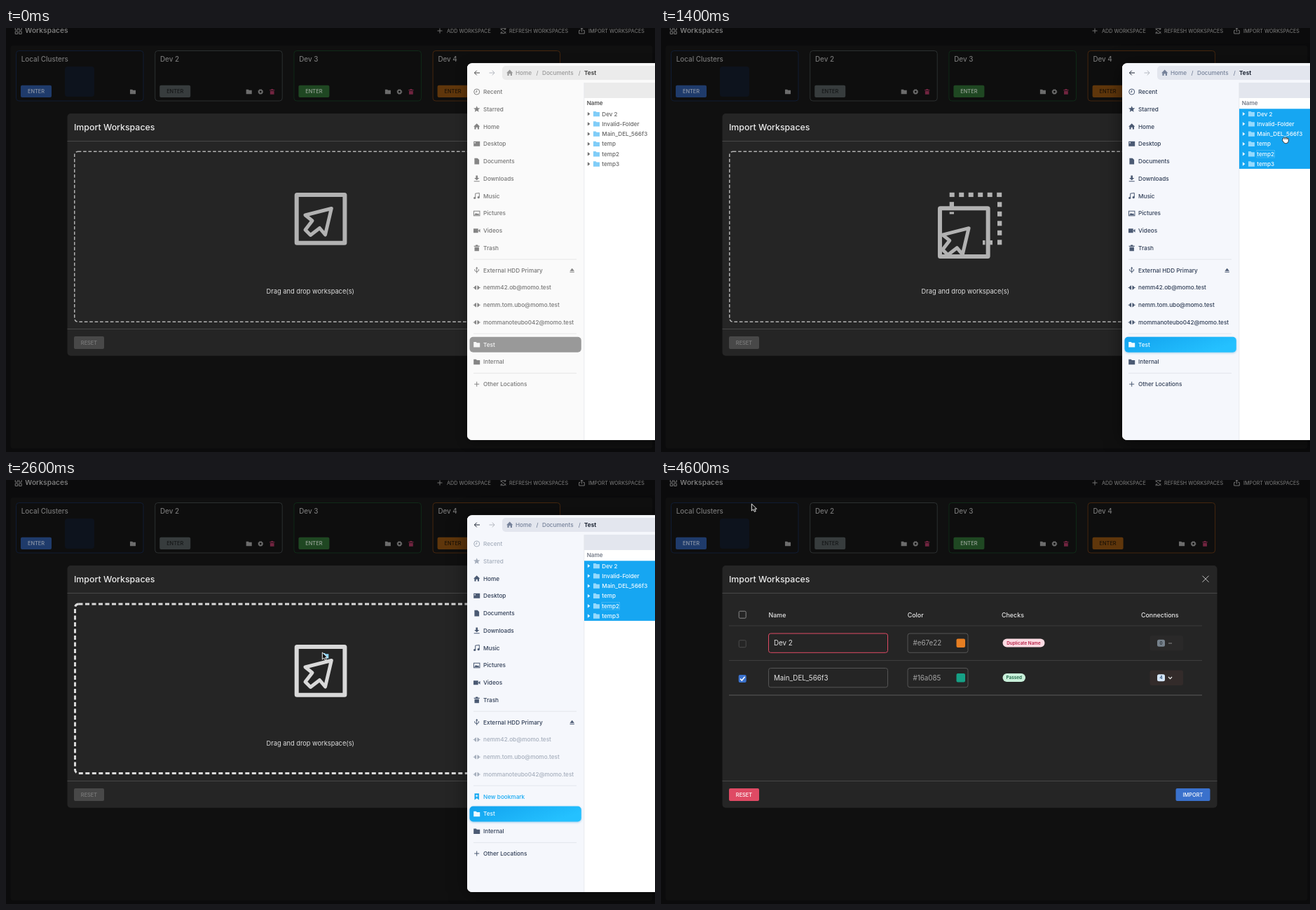
Recreate the animation shown at these times as an HTML page. Size 926 px wide and 605 px high, loop 4.8 s.

```html
<!DOCTYPE html>
<html lang="en">
<head>
<meta charset="utf-8">
<title>Import Workspaces</title>
<style>
html, body { margin: 0; width: 100%; height: 100%; overflow: hidden; background: #0b0b0c; }
svg { display: block; width: 926px; height: 605px; font-family: Inter, sans-serif; }
text { white-space: pre; }
.line { fill: none; stroke: currentColor; stroke-width: 1; }
</style>
</head>
<body>
<svg id="stage" viewBox="0 0 926 605"></svg>
<script>
const LOOP = 4800, STEP = 100;
const PANEL = '#252525', BLUE = '#3a71cc', RED = '#df4a64';

const rect = (x, y, w, h, fill, r = 0, extra = '') =>
  `<rect x="${x}" y="${y}" width="${w}" height="${h}" rx="${r}" fill="${fill}" ${extra}/>`;
const box = (x, y, w, h, stroke, r = 3, fill = 'none') =>
  rect(x, y, w, h, fill, r, `stroke="${stroke}"`);
const hline = (x1, x2, y, color) => rect(x1, y - 0.5, x2 - x1, 1, color);
// y is the middle of the capitals
const text = (x, y, s, size, fill, weight = 400, anchor = 'start') =>
  `<text x="${x}" y="${y + size * 0.364}" font-size="${size}" fill="${fill}" font-weight="${weight}" text-anchor="${anchor}">${s}</text>`;
const fillPath = d => `<path fill="currentColor" d="${d}"/>`;
const linePath = d => `<path class="line" d="${d}"/>`;

const ICONS = {
  clock: '<circle class="line" r="4"/>' + linePath('M0-2.3V.3H-2'),
  star: fillPath('M0-4.6 1.3-1.5 4.6-1.3 2.1.8 2.9 4 0 2.3-2.9 4-2.1.8-4.6-1.3-1.3-1.5Z'),
  home: fillPath('M0-4.4 4.6.2H3.3V4H1.1V1.2H-1.1V4H-3.3V.2H-4.6Z'),
  desktop: fillPath('M-4.5-3.5H4.5V3.5H-4.5ZM-3.4-2.4V-.8H-1.8V-2.4Z'),
  doc: fillPath('M-3.3-4.4H1L3.4-2V4.4H-3.3Z'),
  down: fillPath('M-1.3-4.4H1.3V-.8H3.6L0 2.4-3.6-.8H-1.3ZM-4 3.3H4V4.4H-4Z'),
  music: linePath('M-2 2.8V-3.5L3.6-4.2V1.9') + '<circle cx="-3" cy="2.8" r="1.6" fill="currentColor"/><circle cx="2.5" cy="2" r="1.6" fill="currentColor"/>',
  picture: '<rect class="line" x="-4.2" y="-3.2" width="8.4" height="6.6"/>' + fillPath('M-3.5 2.6-1.2-.7.6 1 1.8-.2 3.6 2.6Z'),
  video: fillPath('M-4.7-3H2V3H-4.7ZM2.4-.4 4.8-2.6V2.6L2.4.4Z'),
  trash: fillPath('M-4-3.3H-1.6V-4.4H1.6V-3.3H4V-2H-4ZM-3.2-1.2H3.2V4.3H-3.2Z'),
  usb: linePath('M0 4V-4M-2.8-1.5V.6L0 2.4 2.8.6V-1.5') + fillPath('M0-5 1.6-2.5H-1.6Z'),
  net: linePath('M-5 0H-3M3 0H5') + fillPath('M-3.4-1.5-.7-3.2V3.2L-3.4 1.5ZM3.4-1.5.7-3.2V3.2L3.4 1.5Z'),
  folder: fillPath('M-4.5-3.7H-.9L.1-2.5H4.5V3.7H-4.5Z'),
  plus: linePath('M-3.5 0H3.5M0-3.5V3.5'),
  mark: fillPath('M-3.2-4.5H3.2V4.7L0 2.3-3.2 4.7ZM-.5-2.8V-1.5H-1.8V-.5H-.5V.8H.5V-.5H1.8V-1.5H.5V-2.8Z'),
  eject: fillPath('M0-3 3.2 1H-3.2ZM-3.2 2H3.2V3.1H-3.2Z'),
  gear: '<circle r="2.6" fill="none" stroke="currentColor" stroke-width="2"/><circle class="line" r="3.8" stroke-dasharray="1.5 1.5"/>',
  grid: linePath('M-4.5-4.5H-1V-1H-4.5ZM1-4.5H4.5V-1H1ZM-4.5 1H-1V4.5H-4.5ZM1 1H4.5V4.5H1Z'),
  refresh: linePath('M-3.6-1A3.7 3.7 0 0 1 3-2.3M3.6 1A3.7 3.7 0 0 1-3 2.3M3.3-4.4V-2H1M-3.3 4.4V2H-1M-4-3.5 4 3.8'),
  upload: linePath('M0 1.5V-4M-2-2.2 0-4.2 2-2.2M-2-.5H-3.8V4H3.8V-.5H2'),
  back: linePath('M4 0H-3.5M-.3-3.3-3.6 0-.3 3.3'),
  tri: fillPath('M-1.6-2.7 1.9 0-1.6 2.7Z'),
};
const icon = (name, x, y, color, scale = 1) =>
  `<g color="${color}" transform="translate(${x} ${y}) scale(${scale})">${ICONS[name]}</g>`;

const CARDS = [
  ['Local Clusters', '#101c33', '#1f3b6b', '#8f98a8'],
  ['Dev 2', '#2c3031', '#373c3d', '#141617'],
  ['Dev 3', '#102b18', '#1f4722', '#98a498'],
  ['Dev 4', '#45270f', '#5f360b', '#1c1206'],
];

function page() {
  let s = rect(0, 0, 926, 605, '#0b0b0c') + rect(6.5, 25, 916, 575, '#101010', 4);
  s += icon('grid', 17.7, 4, '#747474') + text(27, 3.7, 'Workspaces', 10.2, '#7a7a7a', 600);
  [['plus', 619, 629, 'ADD WORKSPACE'], ['refresh', 709.5, 718, 'REFRESH WORKSPACES'], ['upload', 821.5, 831, 'IMPORT WORKSPACES']]
    .forEach(([name, ix, x, label]) => s += icon(name, ix, 4, '#727272') + text(x, 4, label, 7.2, '#727272', 500));
  CARDS.forEach(([name, border, fill, ink], i) => {
    const x = 14.5 + i * 198.2;
    s += box(x, 32.5, 181.5, 71.5, border, 4, '#0e0e0e');
    if (!i) s += rect(84, 55, 42, 43, '#0d131d', 4);
    s += text(x + 7.3, 44.3, name, 9.85, '#777', 500);
    s += rect(x + 6.5, 81.7, 44, 17.3, fill, 2) + text(x + 28.5, 90.4, 'ENTER', 7.4, ink, 500, 'middle');
    s += icon('folder', x + (i ? 134 : 166.5), 91, '#6c6c6c', 0.9);
    if (i) s += icon('gear', x + 150.5, 91, '#6c6c6c', 0.9) + icon('trash', x + 167, 91, '#712440', 0.9);
  });
  return s;
}

function dropIcon(t, color) {
  const p = t < 500 ? 1 : Math.min(1, Math.max(0, (t - 900) / 1000));
  const q = 1 - p, pitch = 13.5;
  let s = '';
  if (q) {
    const dot = (x, y, w = 7, h = 7) => rect(x, y, w, h, color);
    for (let i = 0; i < 6; i++) s += dot(411.7 + i * pitch, 234.8, 7, 6.3);
    for (let i = 1; i < 6; i++) s += dot(480, 234.8 + i * pitch, 6.3);
    s += dot(411.7, 248.2, 6.3) + dot(411.7, 262.5, 6.3, 3) + dot(466, 303, 7, 6.3) + dot(459, 303, 3.5, 6.3);
  }
  s += rect(414.7 - 33.5 * q, 238 + 38.5 * q, 68.7, 68.7, 'none', 0.5,
    `stroke="${color}" stroke-width="6" stroke-linejoin="round"`);
  // the arrow starts off ahead of the square it drags
  const lag = q ** 1.15, dx = -56 * lag, dy = 62.5 * lag;
  if (p < 0.3) s += rect(421 + dx, 250 + dy, 49, 51, PANEL);
  return s + `<path transform="translate(${dx} ${dy})" fill="none" stroke="${color}" stroke-width="5" stroke-linejoin="round"
    d="M464.3 257.5 427 267 437 275 427 288 434.5 295.5 447.5 285.5 455.5 295Z"/>`;
}

function dropZone(t) {
  const over = t >= 2200, color = over ? '#d9d9d9' : '#b2b2b2', w = over ? 3 : 1.5;
  return rect(97 + w / 2, 175.5 + w / 2, 686 - w, 244.5 - w, 'none', 5,
      `stroke="${color}" stroke-width="${w}" stroke-dasharray="${over ? '6 3.5' : '4.6 2.8'}"`) +
    dropIcon(t, color) + text(434.3, 375.6, 'Drag and drop workspace(s)', 9.28, '#dedede', 400, 'middle') +
    rect(97, 440, 43, 18, '#484848', 2) + text(118.5, 449.2, 'RESET', 7.4, '#7c7c7c', 500, 'middle');
}

function tableRow(y, name, hex, border, chip, count) {
  const [label, chipWidth, chipFill, chipInk] = chip;
  return box(153.5, y - 13.7, 170, 27.3, border) + text(161, y, name, 9.8, '#e3e3e3') +
    box(352, y - 13.7, 86, 27.3, '#555') + text(359.5, y, hex, 9.8, '#a5a5a5') +
    rect(421.5, y - 6.2, 12.5, 12.5, hex, 2) +
    rect(487.5, y - 6.3, chipWidth, 12, chipFill, 6) +
    text(487.5 + chipWidth / 2, y - 0.4, label, 6.35, chipInk, 600, 'middle') +
    rect(697.5, y - 10.7, 47.5, 21.5, count ? '#332b2a' : '#2a2929', 3) +
    rect(708, y - 5, 11, 10, count ? '#d5e5f7' : '#77828c', 2.5) +
    text(713.5, y, count, 6.2, count ? '#24466f' : '#2b3238', 600, 'middle');
}

function table() {
  let s = box(111.2, 187.2, 10, 10, '#888', 1.5);
  [[153.5, 'Name'], [351.7, 'Color'], [486, 'Checks'], [685, 'Connections']]
    .forEach(([x, label]) => s += text(x, 192.8, label, 8.9, '#e6e6e6', 500));
  s += hline(97, 772, 208, '#3d3d3d') + hline(97, 772, 257.5, '#3d3d3d') + hline(97, 772, 307, '#5c5c5c');
  s += tableRow(232.7, 'Dev 2', '#e67e22', RED, ['Duplicate Name', 60, '#fcdbe3', '#b81f45'], 0);
  s += tableRow(282.2, 'Main_DEL_566f3', '#16a085', '#555', ['Passed', 32.5, '#c9f0da', '#17603f'], 4);
  s += box(111.2, 228.7, 10, 10, '#4b4b4b', 1.5) + rect(110.7, 278, 11, 11, BLUE, 2);
  s += '<path d="M113 283.6 115.3 286 119.6 280.8" fill="none" stroke="#fff" stroke-width="1.5"/>';
  s += hline(724, 729, 233, '#8a8a8a') + '<path d="M724 281 726.5 283.6 729 281" fill="none" stroke="#eee" stroke-width="1.2"/>';
  s += '<path d="M772.5 136.7 781.5 145.7M781.5 136.7 772.5 145.7" stroke="#c4c4c4"/>';
  s += rect(97, 440, 43, 18, RED, 2) + text(118.5, 449.2, 'RESET', 7.4, '#fff', 500, 'middle');
  return s + rect(734.5, 440, 49, 18, BLUE, 2) + text(759, 449.2, 'IMPORT', 7.4, '#fff', 500, 'middle');
}

const modal = t => rect(87.5, 122, 706, 345.7, PANEL, 5) +
  text(97, 141.5, 'Import Workspaces', 12.35, '#ececec', 500) +
  hline(87.5, 793.5, 161.5, '#474747') + hline(87.5, 793.5, 429.5, '#474747') +
  (t < 3100 ? dropZone(t) : table());

const PLACES = [['clock', 'Recent'], ['star', 'Starred'], ['home', 'Home'], ['desktop', 'Desktop'], ['doc', 'Documents'],
  ['down', 'Downloads'], ['music', 'Music'], ['picture', 'Pictures'], ['video', 'Videos'], ['trash', 'Trash'], null,
  ['usb', 'External HDD Primary'], ['net', 'nemm42.ob@momo.test'], ['net', 'nemm.tom.ubo@momo.test'],
  ['net', 'mommanoteubo042@momo.test'], null, ['mark', 'New bookmark'], ['folder', 'Test'], ['folder', 'Internal'], null,
  ['plus', 'Other Locations']];
const FILES = ['Dev 2', 'Invalid-Folder', 'Main_DEL_566f3', 'temp', 'temp2', 'temp3'];

function sidebar(active, dragging) {
  const ink = active ? '#2f3d55' : '#767676';
  let y = 91, s = '';
  for (const place of PLACES) {
    if (!place) {
      s += hline(667, 814, y - 8.7, active ? '#e3e6ec' : '#e7e7e7');
      y += 6.9;
      continue;
    }
    const [name, label] = place;
    if (name == 'mark' && !dragging) continue;
    let color = ink, iconColor = active ? '#4b5a73' : '#858585';
    if (dragging && /clock|star|net/.test(name)) color = iconColor = '#a5aebc';
    if (name == 'mark') color = iconColor = '#18aaf2';
    if (label == 'Test') {
      s += active
        ? rect(661.5, y - 11, 159.3, 22, 'url(#glow)', 5, 'style="filter:drop-shadow(0 1px 1.5px rgba(20,140,210,.4))"')
        : rect(661.5, y - 11, 159.3, 22, '#999', 5);
      color = iconColor = active ? '#eefaff' : '#f6f6f6';
    }
    s += icon(name, 671.7, y, iconColor) + text(681, y, label, 8.2, color, 500);
    if (name == 'usb') s += icon('eject', 807.7, y, iconColor);
    y += 24.78;
  }
  return s;
}

function files(t) {
  const active = t >= 400, picked = t < 500 ? 0 : t < 600 ? 2 : t < 700 ? 5 : 6, pitch = 14.27;
  const bg = active ? '#f5f7fc' : '#fafafa', bar = active ? '#e3e6ee' : '#ebebeb';
  const soft = active ? '#76829a' : '#989898', strong = active ? '#1c2433' : '#474747';
  const shadow = active ? '0 3px 13px rgba(0,0,0,.5)' : '0 2px 8px rgba(0,0,0,.35)';
  let s = `<g style="filter:drop-shadow(${shadow})">` + rect(658, 50.3, 300, 537.7, '#fff', 7) + '</g>';
  s += `<path d="M665 50.3H926V78H825V588H665A7 7 0 0 1 658 581V57.3A7 7 0 0 1 665 50.3Z" fill="${bg}"/>`;
  s += rect(708, 54, 230, 20, bar, 5) + rect(825, 78, 101, 22, bar) + rect(824.5, 78, 0.8, 510, '#e4e6ea');
  s += icon('back', 672, 64, strong) + `<g transform="rotate(180 693.5 64)">${icon('back', 693.5, 64, '#b4b8c0')}</g>`;
  s += icon('home', 718.7, 64, soft);
  [[727, 'Home'], [756.5, '/'], [765, 'Documents'], [816.7, '/']].forEach(([x, w]) => s += text(x, 64, w, 8.2, soft, 500));
  s += text(825, 64, 'Test', 8.15, strong, 700) + sidebar(active, t >= 1800);
  s += text(828.7, 107.3, 'Name', 8.15, active ? '#747b88' : '#505050', 600);
  if (picked) s += rect(825, 115.3, 101, picked * pitch, '#16a6f2');
  FILES.forEach((name, i) => {
    const y = 122.6 + i * pitch, on = i < picked;
    s += icon('tri', 831.5, y, on ? '#e2f5ff' : '#707070') + icon('folder', 842.5, y, on ? '#95dafd' : '#80cdf8');
    s += text(850.3, y, name, 8.15, on ? '#f4fbff' : '#666', 500);
  });
  if (t >= 1200) s += rect(850, 174.5, 25.5, 10.5, 'none', 0, 'stroke="#8ad4fb" stroke-width=".7" stroke-dasharray="1 1"');
  return s;
}

const PATH = [[300, 922, 112], [400, 921, 114], [700, 907.2, 203], [800, 893, 147], [900, 892, 142], [1400, 891, 160],
  [1500, 887, 164], [2000, 782, 190], [2100, 492, 247.3], [2500, 451.3, 246], [3000, 451.3, 246], [3100, 451, 307.5],
  [3200, 451, 307.5], [3400, 336.3, 154], [4500, 336.3, 154], [4600, 129.3, 34], [4800, 129.3, 34]];

function pointer(t) {
  if (t < 300) return '';
  const i = PATH.findIndex((k, n) => n && t <= k[0]);
  const [t0, x0, y0] = PATH[i - 1], [t1, x1, y1] = PATH[i];
  const f = (t - t0) / (t1 - t0), x = x0 + (x1 - x0) * f, y = y0 + (y1 - y0) * f;
  let s = '';
  if (t >= 1500 && t < 3100) {
    const dropped = t >= 2500;
    s += icon('folder', x + (dropped ? 4.5 : 33), y + 4.8, '#8bd5f8');
  }
  const hand = t >= 1100 && t < 2100;
  s += `<path transform="translate(${x} ${y})" stroke-linejoin="round" ` + (hand
    ? 'd="M-3.5-1.5V-3Q-2.5-4.4-1.5-3.2-.5-4.8.7-3.3 1.8-4.5 2.7-2.8 4.3-3.3 4.3-1.3V1.5Q4 4.5.6 4.7-2 4.7-3.2 2.2L-4.4.2Q-4.6-1.2-3.5-1.5ZM-1.3-3V-1M.8-3V-1M2.7-2.7V-1" fill="#fff" stroke="#222" stroke-width=".9"/>'
    : 'd="M0 0V10L2.4 7.9 4.1 11.3 5.9 10.5 4.3 7.2H7.3Z" fill="#111" stroke="#fff" stroke-width=".9"/>');
  if (t >= 2100 && t < 2500) s += `<circle cx="${x + 3.3}" cy="${y + 8.7}" r="3.8" fill="#27a52f"/>` +
    `<path d="M${x + 1.3} ${y + 8.7}h4m-2-2v4" stroke="#fff"/>`;
  return s;
}

const DEFS = '<defs><linearGradient id="glow" y2=".4"><stop stop-color="#12a2ee"/><stop offset="1" stop-color="#24c1ff"/></linearGradient></defs>';
const stage = document.getElementById('stage'), start = performance.now();
let shown = -1;

function draw() {
  const t = Math.floor((performance.now() - start) % LOOP / STEP) * STEP;
  if (t !== shown) {
    shown = t;
    stage.innerHTML = DEFS + page() + modal(t) + (t < 3100 ? files(t) : '') + pointer(t);
  }
  requestAnimationFrame(draw);
}
draw();
</script>
</body>
</html>
```
